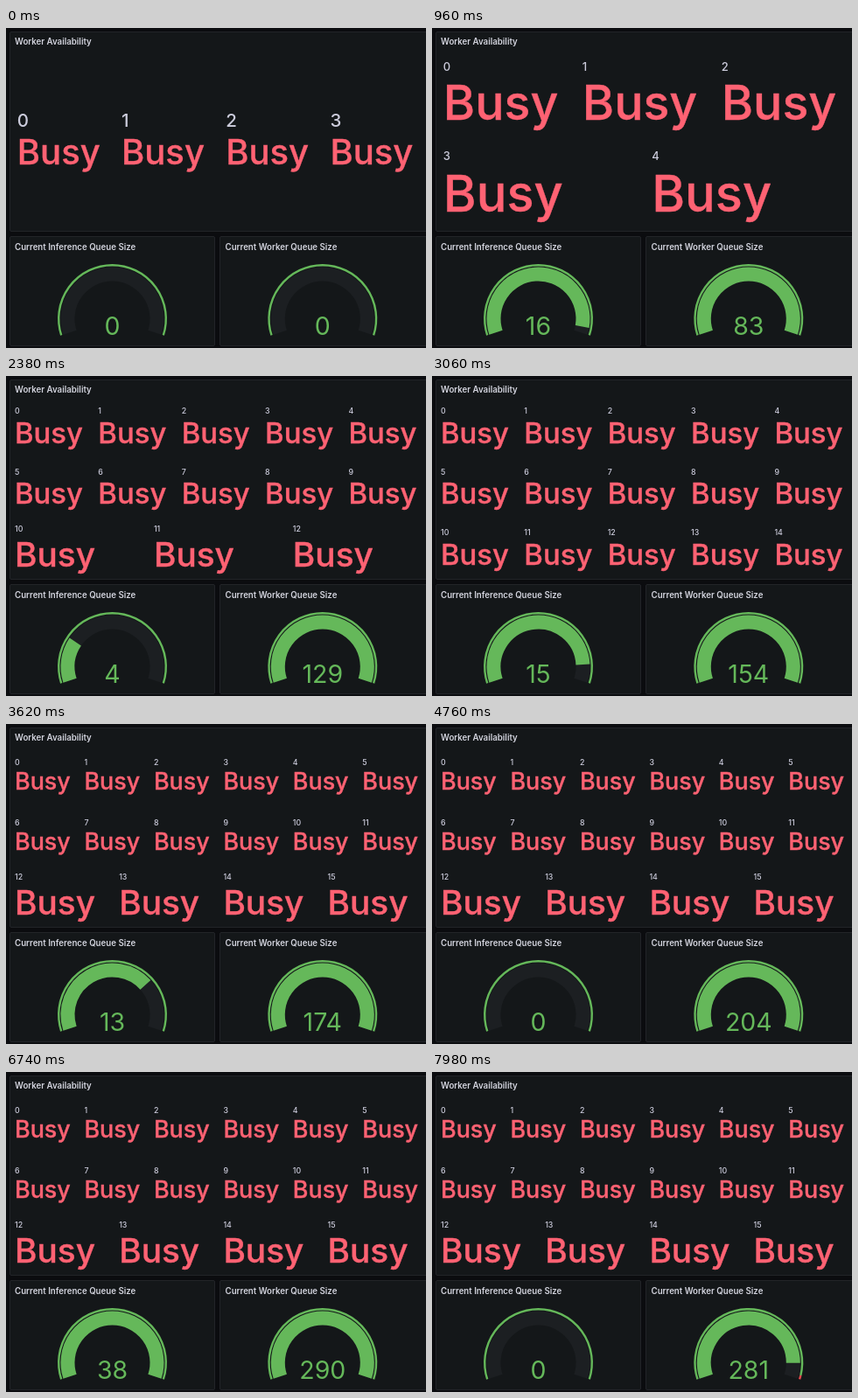
Write an HTML page that moves like this. It is 480x366 px and loops after 8 s.

```html
<!DOCTYPE html>
<html lang="en">
<head>
<meta charset="utf-8">
<title>Worker dashboard</title>
<style>
  html, body { margin: 0; width: 100%; height: 100%; overflow: hidden; background: #0b0c0f; }
  svg { display: block; width: 480px; height: 366px; font-family: Inter, sans-serif; }
  .panel { fill: #141719; stroke: #222428; }
  .title { font-size: 9.7px; font-weight: 600; fill: #d3d4de; }
  .label { font-weight: 500; fill: #ccccdc; }
  .busy { font-weight: 500; fill: #ff6273; stroke: #ff6273; stroke-width: 0.35px; }
  .value { font-size: 28.5px; text-anchor: middle; }
  path { fill: none; }
</style>
</head>
<body>
<svg viewBox="0 0 480 366">
  <rect class="panel" x="4.5" y="4.5" width="477" height="228" rx="1.5"/>
  <rect class="panel" x="4.5" y="238.5" width="234" height="125" rx="1.5"/>
  <rect class="panel" x="244.5" y="238.5" width="237" height="125" rx="1.5"/>
  <text class="title" x="10" y="19">Worker Availability</text>
  <text class="title" x="10" y="254">Current Inference Queue Size</text>
  <text class="title" x="250.5" y="254">Current Worker Queue Size</text>
  <g id="workers"></g>
  <g id="inference"></g>
  <g id="queue"></g>
</svg>
<script>
const LOOP = 8000;
const GREEN = '#65b85a', RED = '#e5484d', TRACK = '#1c1f22';
const LIMIT = 300;

// [time, value]
const inferenceKeys = [[0, 0], [900, 16.6], [1700, 7], [2380, 4], [3220, 18], [3620, 13],
  [4760, 0], [6740, 38], [7980, 0]];
const queueKeys = [[0, 0], [1440, 124], [1700, 94], [2380, 129], [3620, 174], [4760, 204],
  [6740, 290], [7200, 306], [7980, 281]];
// Times at which workers 5, 6, 7 ... join the first four
const joinTimes = [900, 1060, 1220, 1400, 1540, 1800, 1940, 2100, 2240, 2700, 3060, 3480];

const byId = id => document.getElementById(id);
const pen = document.createElement('canvas').getContext('2d');
pen.font = '500 100px Inter, sans-serif';
const busyEm = pen.measureText('Busy').width / 100;

// Updates come in threes: two short ones, then a long hold
function holdTime(t) {
  const phase = (t - 1660 + 12 * 140) % 140;
  return Math.max(0, t - phase + Math.min(40, Math.floor(phase / 20) * 20));
}

function valueAt(keys, t) {
  const i = keys.findIndex(key => key[0] > t);
  if (i < 0) return keys[keys.length - 1][1];
  const [t0, v0] = keys[i - 1], [t1, v1] = keys[i];
  return Math.round(v0 + (v1 - v0) * (t - t0) / (t1 - t0));
}

function peakAt(keys, t) {
  const past = keys.filter(key => key[0] <= t).map(key => key[1]);
  return Math.max(valueAt(keys, t), ...past);
}

function text(cls, x, y, size, content) {
  return `<text class="${cls}" x="${x}" y="${y}" font-size="${size}">${content}</text>`;
}

function workerGrid(count) {
  const rows = count <= 4 ? 1 : count <= 12 ? 2 : 3;
  const cols = Math.ceil(count / rows);
  const labelSize = [20.5, 13, 8.8][rows - 1];
  const left = rows === 3 ? 10 : 12.8;
  const lineHeight = 1.19, capHalf = 0.364;
  let out = '';
  for (let i = 0; i < count; i++) {
    const row = Math.floor(i / cols);
    const inRow = Math.min(cols, count - row * cols);
    const pitch = 476.8 / inRow;
    const width = rows === 3 ? Math.min(92, 0.9 * pitch - 7.8) : Math.min(137, 0.92 * pitch - 14.7);
    const size = width / busyEm;
    const center = 129 + (row - (rows - 1) / 2) * 208 / rows;
    const half = (labelSize + size) * lineHeight / 2;
    const x = left + (i - row * cols) * pitch;
    out += text('label', x, center - half + labelSize * (lineHeight / 2 + capHalf), labelSize, i);
    out += text('busy', x, center + half - size * (lineHeight / 2 - capHalf), size, 'Busy');
  }
  return out;
}

// Arc over the 216 degree dial; from and to are fractions of it
function arc(cx, r, from, to, width, color) {
  if (to <= from) return '';
  const cy = 332.5;
  const point = f => {
    const a = (162 + 216 * f) * Math.PI / 180;
    return `${cx + r * Math.cos(a)} ${cy + r * Math.sin(a)}`;
  };
  const large = (to - from) * 216 > 180 ? 1 : 0;
  return `<path d="M${point(from)}A${r} ${r} 0 ${large} 1 ${point(to)}" stroke="${color}" stroke-width="${width}"/>`;
}

function gauge(cx, value, max) {
  const color = value >= LIMIT ? RED : GREEN;
  const safe = max > LIMIT ? LIMIT / max : 1;
  return arc(cx, 51, 0, 1, 16, TRACK)
    + arc(cx, 51, 0, max ? Math.min(1, value / max) : 0, 16, color)
    + arc(cx, 61.3, 0, safe, 2.4, GREEN)
    + arc(cx, 61.3, safe, 1, 2.4, RED)
    + `<text class="value" x="${cx}" y="350.5" fill="${color}">${value}</text>`;
}

let lastTime = -1, lastCount = 0;
function draw(now) {
  const t = holdTime(now % LOOP);
  if (t !== lastTime) {
    const count = 4 + joinTimes.filter(time => time <= t).length;
    if (count !== lastCount) byId('workers').innerHTML = workerGrid(count);
    byId('inference').innerHTML = gauge(121.5, valueAt(inferenceKeys, t), peakAt(inferenceKeys, t));
    byId('queue').innerHTML = gauge(361.8, valueAt(queueKeys, t), peakAt(queueKeys, t));
    lastTime = t;
    lastCount = count;
  }
}

const start = performance.now();
function frame() {
  draw(performance.now() - start);
  requestAnimationFrame(frame);
}
frame();
</script>
</body>
</html>
```
